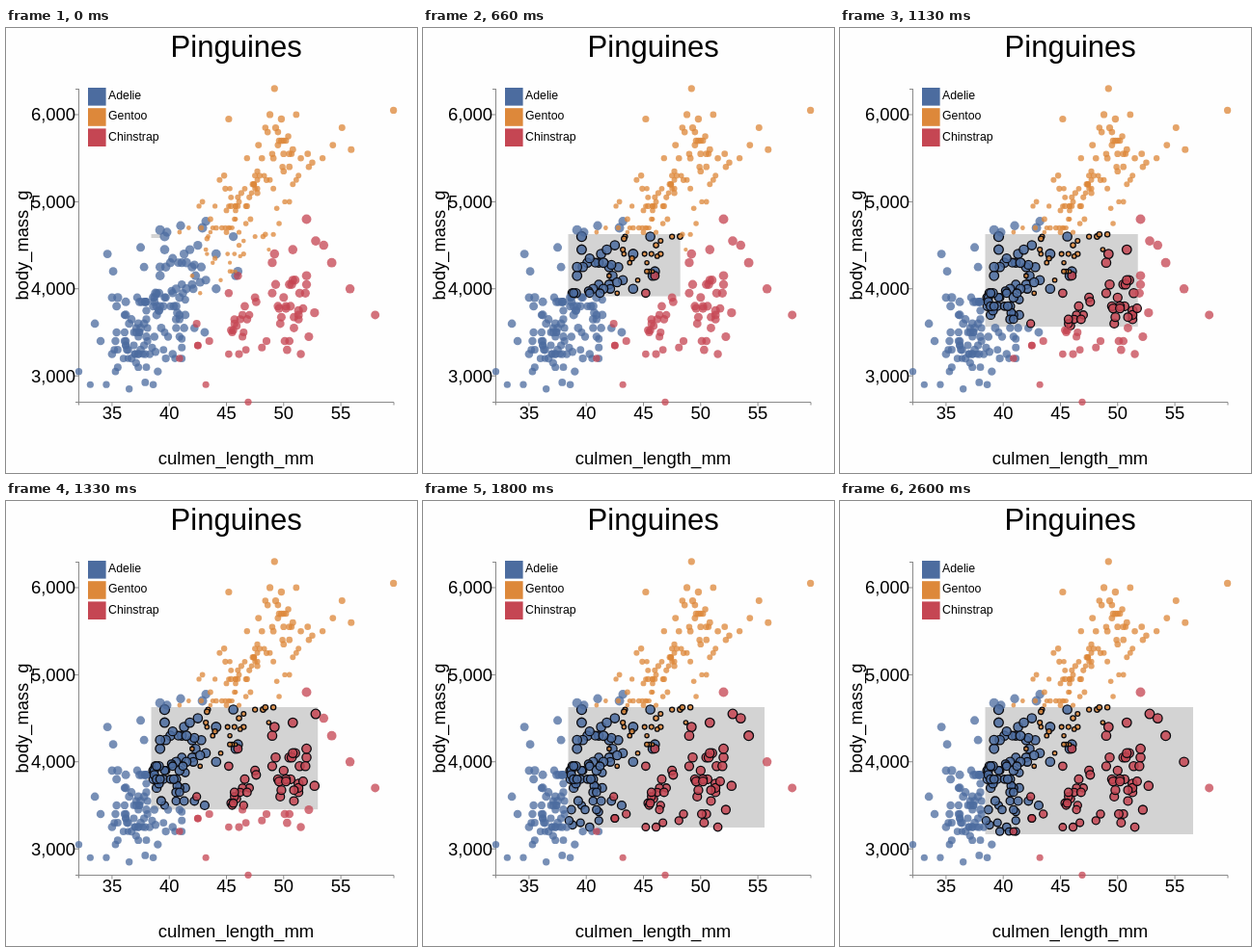
Write an HTML page that moves like this. It is 426 px wide and 462 px high and loops after 3530 ms.

```html
<!DOCTYPE html>
<html lang="en">
<head>
<meta charset="utf-8">
<title>Brushed scatter plot</title>
<style>
html, body { margin: 0; width: 100%; height: 100%; overflow: hidden; background: #fefefe; }
svg { display: block; width: 426px; height: 462px; font: 18.4px "Liberation Sans", Arial, sans-serif; }
circle { fill-opacity: .76; }
circle.on { stroke: #0b0b0f; stroke-width: 1.3; fill-opacity: .86; }
.axis { stroke: #8a8a8a; fill: none; }
.mid { text-anchor: middle; }
.end { text-anchor: end; }
</style>
</head>
<body>
<svg viewBox="0 0 426 462">
  <rect id="brush" x="150.5" y="214" fill="#d3d3d3"/>
  <g id="axes"><path class="axis" d="M75.5 63V391.5M72 388.5H402V391.5M72 63.5H75.5"/></g>
  <g id="dots"></g>
  <g id="legend" font-size="12.3"></g>
  <text class="mid" x="238.7" y="30" font-size="31">Pinguines</text>
  <text class="mid" x="238.5" y="453" font-size="18.5">culmen_length_mm</text>
  <text class="mid" transform="translate(23 225.5) rotate(-90)" font-size="18.3">body_mass_g</text>
</svg>
<script>
const $ = id => document.getElementById(id);
const LOOP = 3530, STEP = 66.67;
const px = mm => 75.5 + (mm - 32.1) * 11.86;
const py = kg => 388.3 - (kg - 2.7) * 90.4;

let seed = 7;
const rnd = () => (seed = (seed * 16807) % 2147483647) / 2147483647;
const between = (a, b) => a + (b - a) * rnd();
const snap = (v, unit) => Math.round(v / unit) * unit;

function add(parent, tag, attrs, text = "") {
  const el = document.createElementNS("http://www.w3.org/2000/svg", tag);
  for (const k in attrs) el.setAttribute(k, attrs[k]);
  el.textContent = text;
  return parent.appendChild(el);
}

// points: culmen length (mm), body mass (kg) of the distinct birds
// crowd: [count, mm from, mm to, kg from, kg to] for the dense parts
// depth: culmen depth (mm), which sets the dot size
const species = [
  {
    name: "Adelie", color: "#4c6c9f",
    points: [
      39.1,3.75, 39.5,3.8, 40.3,3.25, 42,4.25, 41.1,3.2, 38.6,3.8, 38.7,3.45, 42.5,4.5,
      46,4.2, 40.6,3.55, 40.5,3.2, 39.5,3.3, 39.2,4.15, 38.8,3.95, 42.2,3.55, 44.1,4.4,
      39.6,4.6, 41.1,3.425, 42.3,4.15, 39.6,3.5, 40.1,4.3, 42,4.05, 41.4,3.7, 40.6,3.8,
      41.3,4.4, 41.1,4.05, 41.8,4.45, 39.7,3.9, 45.8,4.15, 42.8,4.25, 40.9,3.7, 42.1,4,
      41.3,3.55, 41.1,4.3, 39.6,4.45, 40.8,4.3, 40.3,4.35, 43.2,4.1, 45.6,4.6, 39.7,3.2,
      42.2,4.275, 39.6,3.9, 42.7,4.075, 41.1,3.325, 41.4,3.875, 40.6,4, 38.8,3.275,
      41.5,4.3, 44.1,4, 38.5,3.325, 43.1,3.5, 40.2,3.975, 39.7,4.25, 40.7,3.725,
      39.2,4.25, 41.5,4, 34.6,4.4, 35.1,4.2, 37.8,4.25, 37.5,4.475, 41,4.725, 43.2,4.775,
      42.9,4.7, 39.2,4.675, 39.8,4.65, 32.1,3.05, 33.1,2.9, 33.5,3.6, 34.5,2.9, 38.6,2.9,
      39,3.05, 36.5,2.85, 37.9,2.925, 34,3.4
    ],
    crowd: [[58, 35, 38.3, 3.03, 3.95], [19, 38.6, 41.2, 3.42, 3.97]],
    depth: (mm, kg) => 18.2 + 1.7 * (kg - 3.7) + between(-.8, .8)
  },
  {
    name: "Chinstrap", color: "#c54653",
    points: [
      46.5,3.5, 50,3.9, 51.3,3.65, 45.4,3.525, 52.7,3.725, 45.2,3.95, 46.1,3.25, 51.3,3.75,
      46,4.15, 51.3,3.7, 46.6,3.8, 51.7,3.775, 47,3.7, 52,4.05, 45.9,3.575, 50.5,4.05,
      50.3,3.3, 58,3.7, 46.4,3.45, 49.2,4.4, 42.4,3.6, 48.5,3.4, 43.2,2.9, 50.6,3.8,
      46.7,3.3, 52,4.15, 50.5,3.4, 49.5,3.8, 46.4,3.7, 52.8,4.55, 40.9,3.2, 54.2,4.3,
      42.5,3.35, 51,4.1, 49.7,3.6, 47.5,3.9, 47.6,3.85, 52,4.8, 46.9,2.7, 53.5,4.5,
      49,3.95, 46.2,3.65, 50.9,3.55, 45.5,3.5, 50.9,3.675, 50.8,4.45, 50.1,3.4, 49,4.3,
      51.5,3.25, 49.8,3.675, 48.1,3.325, 51.4,3.95, 45.7,3.6, 50.7,4.05, 42.5,3.35,
      52.2,3.45, 45.2,3.25, 49.3,4.05, 50.2,3.8, 45.6,3.525, 51.9,3.95, 46.8,3.65,
      45.7,3.65, 55.8,4, 43.5,3.4, 49.6,3.775, 50.8,4.1, 50.2,3.775
    ],
    crowd: [],
    depth: (mm, kg) => 18.4 + 1.2 * (kg - 3.73) + .15 * (Math.min(mm, 53) - 48.8) + between(-.4, .4)
  },
  {
    name: "Gentoo", color: "#dd883a",
    points: [
      46.1,4.5, 48.7,4.45, 46.5,4.55, 43.3,4.4, 45.8,4.2, 42,4.15, 46.5,4.4, 44.5,4.1,
      48.2,4.6, 44,4.35, 42.7,3.95, 45.3,4.3, 45.5,4.2, 45.1,4.4, 43.8,4.3, 43.2,4.45,
      45.3,4.2, 45.7,4.4, 47.5,4.6, 49.1,4.625, 43.4,4.6, 48.4,4.625, 43.3,4.575,
      46.2,4.375, 49.2,6.3, 59.6,6.05, 55.1,5.85, 55.9,5.6, 54.3,5.65, 53.4,5.5,
      52.5,5.45, 52.2,5.4, 52.1,5.55, 51.5,5.5, 51.3,5.3, 51.1,5.25, 51.1,6, 50.8,5.2,
      48.8,6, 49.8,5.95, 45.2,5.95, 44.4,5.25, 46.8,5.5, 42.9,5, 42.6,4.95, 40.9,4.65,
      41.7,4.7, 42.8,4.7, 50.5,5, 50.1,5, 49.6,4.75, 49.4,4.925, 49.1,5.15, 48.4,5.85,
      49.3,5.85, 49.5,5.8, 48.6,5.8, 50.4,5.75, 50,5.7, 49.6,5.7, 50.2,5.7, 49.8,5.7,
      49.5,5.65, 47.8,5.65, 50.8,5.6, 49,5.55, 50,5.55, 50.5,5.55, 50.7,5.55, 48.1,5.5,
      49.1,5.5, 50.5,5.4, 49.9,5.4, 50,5.35
    ],
    crowd: [[8, 43.5, 45.5, 4.65, 4.95], [34, 44.8, 47.8, 4.65, 5.3], [7, 47.2, 48.8, 4.85, 5.4]],
    depth: (mm, kg) => 15 + 1.4 * (kg - 5.08) + between(-.5, .5)
  }
];

const dots = [];
for (const s of species) {
  const birds = [];
  for (let i = 0; i < s.points.length; i += 2) birds.push([s.points[i], s.points[i + 1]]);
  for (const [n, x0, x1, y0, y1] of s.crowd)
    for (let i = 0; i < n; i++) birds.push([snap(between(x0, x1), .1), snap(between(y0, y1), .05)]);
  for (const [mm, kg] of birds) {
    const depth = Math.max(13.1, s.depth(mm, kg));
    const x = px(mm), y = py(kg), r = Math.sqrt((9 + 9.6 * (depth - 13.1)) / Math.PI);
    dots.push({ x, y, el: add($("dots"), "circle", { cx: x, cy: y, r, fill: s.color }) });
  }
}

for (let mm = 35; mm <= 55; mm += 5) {
  add($("axes"), "path", { class: "axis", d: `M${px(mm)} 388V392.5` });
  add($("axes"), "text", { class: "mid", x: px(mm), y: 406 }, mm);
}
for (let kg = 3; kg <= 6; kg++) {
  add($("axes"), "path", { class: "axis", d: `M71 ${py(kg)}H75.5` });
  add($("axes"), "text", { class: "end", x: 72, y: py(kg) + 6.5 }, kg + ",000");
}
[species[0], species[2], species[1]].forEach((s, i) => {
  add($("legend"), "rect", { x: 85, y: 62 + i * 21.2, width: 18.6, height: 18.6, fill: s.color });
  add($("legend"), "text", { x: 106, y: 74.3 + i * 21.1 }, s.name);
});

// dragged corner: time, x, y
const drag = [
  [0, 161, 218], [330, 221, 251], [660, 266, 278], [930, 294, 300], [1330, 323, 320],
  [1800, 354, 339], [2330, 361, 340], [2460, 361, 340], [2600, 366, 346], [LOOP, 366, 346]
];
function corner(t) {
  const i = drag.findIndex(k => k[0] > t);
  const [t0, x0, y0] = drag[i - 1], [t1, x1, y1] = drag[i], p = (t - t0) / (t1 - t0);
  return [x0 + (x1 - x0) * p, y0 + (y1 - y0) * p];
}

const start = performance.now();
function draw(now) {
  const t = Math.max(0, now - start) % LOOP;
  const [x, y] = corner(Math.floor((t + 8) / STEP) * STEP % LOOP);
  $("brush").setAttribute("width", x - 150.5);
  $("brush").setAttribute("height", y - 214);
  for (const d of dots)
    d.el.classList.toggle("on", d.x > 150.5 && d.x < x && d.y > 213.5 && d.y < y);
  requestAnimationFrame(draw);
}
draw(start);
</script>
</body>
</html>
```
